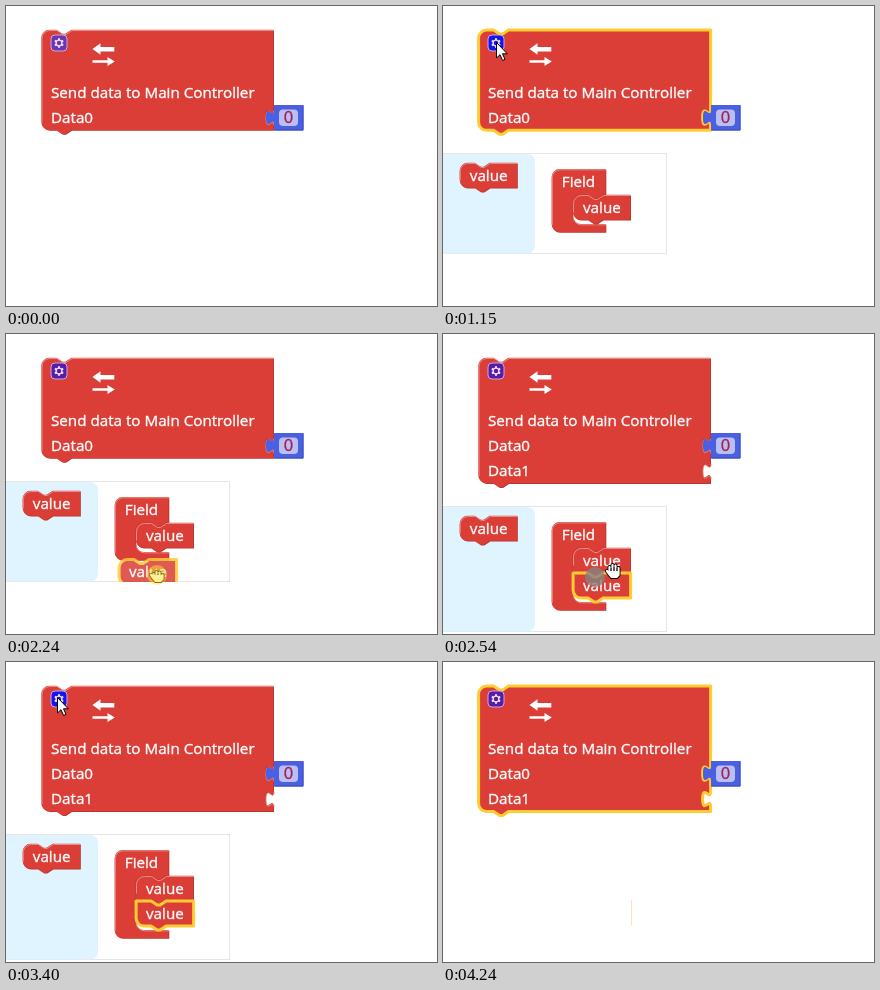
Recreate the animation shown at these times as an HTML page. Size 431 by 300 pixels, loop 4.87 s.

```html
<!DOCTYPE html>
<html lang="en">
<head>
<meta charset="utf-8">
<title>Adding a data field to a block</title>
<style>
html, body { margin: 0; width: 100%; height: 100%; overflow: hidden; background: #fff; }
svg { display: block; width: 431px; height: 300px; }
text { font: 15.2px "Open Sans", "Noto Sans", sans-serif; fill: #fff; stroke: #fff; stroke-width: .35px; }
.digit { font-size: 16.5px; fill: #a3215a; stroke: #a3215a; }
</style>
</head>
<body>
<svg id="stage" viewBox="0 0 431 300"></svg>
<script>
const LOOP = 4870, START = 217, TICK = 77.3;
const RED = '#db3e37', DARK = '#b5332e', LIGHT = '#e98a84', YELLOW = '#fc3', BLUE = '#4a5fe2';
const NOTCH = 'l6,4 3,0 6,-4', TAB = 'l-6,4 -3,0 -6,-4';
const SOCKET = 'c0,10 -8,-8 -8,7.5 s8,-2.5 8,7.5';

// Ticks at which the scene changes
const PRESS = 9, OPEN = 11, PICK = 18, GRAB = 20, DRAG = 22, DROP = 29, CLOSE_PRESS = 42, CLOSE = 43, EXIT = 52;

// Where the pointer turns or rests; it eases from stop to stop
const stop = (k, x, y) => ({ k, x, y });
const STOPS = [
  stop(0, 302, 285), stop(4, 32, 32), stop(6, 55, 16), stop(8, 53, 36), stop(13, 53, 36),
  stop(PICK, 54, 198), stop(GRAB, 53, 172), stop(26, 151, 241), stop(DROP - 1, 152, 243),
  stop(30, 170, 237), stop(34, 140, 50), stop(41, 51, 35), stop(45, 51, 35), stop(EXIT - 1, 355, 292)
];
const HOLDS = [[PRESS, PRESS + 1], [GRAB, DROP], [CLOSE_PRESS, CLOSE]];

const within = (k, from, to) => k >= from && k < to;
const ease = u => u * u * (3 - 2 * u);
const at = (x, y, body, extra = '') => `<g transform="translate(${x} ${y})" ${extra}>${body}</g>`;
const text = (x, y, s, extra = '') => `<text x="${x}" y="${y}" ${extra}>${s}</text>`;
const path = (d, attrs) => `<path d="${d}" ${attrs}/>`;
const line = (d, color, width = 1) => path(d, `fill="none" stroke="${color}" stroke-width="${width}"`);

function pointer(k) {
  if (k < 0 || k >= EXIT) return null;
  const i = Math.max(1, STOPS.findIndex(s => s.k >= k));
  const a = STOPS[i - 1], b = STOPS[i], u = ease((k - a.k) / (b.k - a.k));
  return { x: a.x + (b.x - a.x) * u, y: a.y + (b.y - a.y) * u };
}

// Fill with a dark lower edge, and either a light upper edge or the selection outline
function shape(outline, edge, selected) {
  return path(outline, `fill="${DARK}"`) +
    path(outline, `fill="${RED}" transform="translate(-.7 -.7)"`) +
    (selected ? at(-.4, -.4, line(outline, YELLOW, 3), 'stroke-linejoin="round"') : line(edge, LIGHT));
}

function block(w, h, { sockets = [], selected, flatTop, flatBottom } = {}) {
  const top = (flatTop ? 'V0' : 'V8 a8,8 0 0 1 8,-8') + `H15 ${NOTCH} H${w}`;
  const right = sockets.map(y => `V${y + 5} ${SOCKET}`).join(' ');
  const foot = `V${h} H30 ${TAB} ` + (flatBottom ? 'H0' : 'H8 a8,8 0 0 1 -8,-8');
  const rims = sockets.map(y => `M${w},${y + 5} ${SOCKET}`).join(' ');
  return shape(`M0,8 ${top} ${right} ${foot} Z`, `M0,${h - 8} ${top} ${rims}`, selected);
}

const valueBlock = (opts = {}) => block(57.5, 25, opts) + text(9.5, 17.3, 'value');

function fieldBlock(n) {
  const end = 30 + 25 * n, h = end + 8;
  const top = 'V8 a8,8 0 0 1 8,-8 H54';
  const mouth = `V25.5 H51 ${TAB} H29 a8,8 0 0 0 -8,8 V${end - 8} a8,8 0 0 0 8,8 H54`;
  return shape(`M0,8 ${top} ${mouth} V${h} H8 a8,8 0 0 1 -8,-8 Z`, `M0,${h - 8} ${top}`) +
    line(`M21,${end - 8} a8,8 0 0 0 8,8 H54`, LIGHT) + text(9.5, 17, 'Field');
}

function gear(k) {
  const hover = within(k, 8, 15) || within(k, 40, 46);
  const fill = hover ? '#1414ee' : k < 8 ? '#6a36b4' : '#571bae';
  let teeth = '';
  for (let a = 0; a < 360; a += 60)
    teeth += `<rect x="-1" y="-4.8" width="2" height="2" fill="#eadcf5" transform="rotate(${a})"/>`;
  return at(53, 37, `<rect x="-8" y="-8" width="16" height="16" rx="4" fill="${fill}" stroke="#c9a9dc"/>` +
    teeth + '<circle r="2.9" fill="none" stroke="#eadcf5" stroke-width="1.4"/>');
}

const arrows = path('M86.5,43 L94.5,37.2 V41 H108.3 V45.4 H94.5 V48.8 Z ' +
  'M108.8,55.5 L101.5,51 V54.2 H86.5 V56.8 H101.5 V60 Z', 'fill="#fff"');

const zeroBlock = path('M0,0 H29.5 V25.5 H0 V20 c0,-10 -8,8 -8,-7.5 s8,2.5 8,-7.5 Z', `fill="${BLUE}"`) +
  line('M.5,25 H29 V.5', '#3a4cba') +
  '<rect x="5" y="4.5" width="19" height="16.5" rx="4" fill="#b9c0f1"/>' +
  text(9.7, 18.2, '0', 'class="digit"');

function mainBlock(k) {
  const sockets = k >= DROP ? [75, 100.5] : [75];
  const selected = within(k, PRESS, DRAG) || k >= CLOSE_PRESS;
  const labels = sockets.map((y, i) => text(45, y + 41.7, 'Data' + i)).join('');
  return at(36, 24.5, block(232, 75 + 25.2 * sockets.length, { sockets, selected })) +
    at(268, 99, zeroBlock) + gear(k) + arrows + text(45, 91.7, 'Send data to Main Controller') + labels;
}

function mutator(k, p) {
  if (!within(k, OPEN, CLOSE)) return '';
  const two = k >= DROP, top = two ? 172.5 : 147.5, h = two ? 125 : 100;
  let body = `<rect x=".5" width="223" height="${h}" fill="#fff" stroke="#e6e6e6"/>` +
    path(`M0,.5 H84 a8,8 0 0 1 8,8 V${h - 8} a8,8 0 0 1 -8,8 H0 Z`, 'fill="#dff4fe"') +
    at(17.3, 10, valueBlock({ selected: within(k, PICK, DRAG) })) +
    at(109.3, 16.3, fieldBlock(two ? 2 : 1)) +
    at(130.5, 42, valueBlock({ flatBottom: two }));
  if (two) body += at(130.5, 67, valueBlock({ selected: true, flatTop: true }));
  if (within(k, DRAG, DROP))
    body += at(p.x - 37.5, p.y - 15 - top, valueBlock({ selected: true }), 'opacity=".85"');
  const clip = `<clipPath id="pane"><rect y="-.5" width="225" height="${h + 1}"/></clipPath>`;
  return at(0, top, clip + `<g clip-path="url(#pane)">${body}</g>`);
}

function hand(closed) {
  const up = closed ? 3 : 0;
  const d = `M-3.5,2 V${-4 + up} M-.5,1 V${-6 + up} M2.5,1 V${-5.5 + up} M5.5,2 V${-3 + up} ` +
    'M-6,0 L-3,4 M-3.5,1 H5.5 V4 L3.5,6 H-1.5 L-3.5,3 Z';
  const pen = (color, w) => path(d, `fill="${color}" stroke="${color}" stroke-width="${w}" ` +
    'stroke-linecap="round" stroke-linejoin="round"');
  const gaps = line(`M-2,0 V${-3 + up} M1,0 V${-4 + up} M4,0 V${-3 + up}`, '#000', .8);
  return pen('#000', 4) + pen('#fff', 2.2) + gaps;
}

const arrowCursor = path('M.5,.5 V16 L4,12.7 L6.6,18.5 L9,17.4 L6.5,11.8 H11.3 Z',
  'fill="#fff" stroke="#000" stroke-linejoin="round"');

// Yellow while the button is down, grey for two ticks where it was released
function clickMark(k) {
  const hold = HOLDS.find(([from, to]) => within(k, from, to + 2));
  if (!hold) return '';
  const down = k < hold[1], p = pointer(Math.min(k, hold[1] - 1));
  return `<circle cx="${p.x}" cy="${p.y}" r="10" ` +
    (down ? 'fill="#ffe02e" opacity=".5"/>' : 'fill="#85827f" opacity=".8"/>');
}

function scene(k) {
  const p = pointer(k);
  let out = mainBlock(k) + mutator(k, p);
  if (k >= CLOSE) out += line('M188.5,238 V264', '#f8e7b4');
  if (!p) return out;
  const dragging = within(k, GRAB, DROP);
  const cursor = at(p.x, p.y, within(k, 17, 32) ? hand(dragging) : arrowCursor);
  return out + (dragging ? cursor + clickMark(k) : clickMark(k) + cursor);
}

const stage = document.getElementById('stage');
const t0 = performance.now();
let shown = null;

function draw() {
  const t = (performance.now() - t0) % LOOP;
  const k = t < START ? -1 : Math.min(EXIT, Math.floor((t - START) / TICK));
  if (k !== shown) {
    shown = k;
    stage.innerHTML = scene(k);
  }
  requestAnimationFrame(draw);
}
draw();
</script>
</body>
</html>
```
